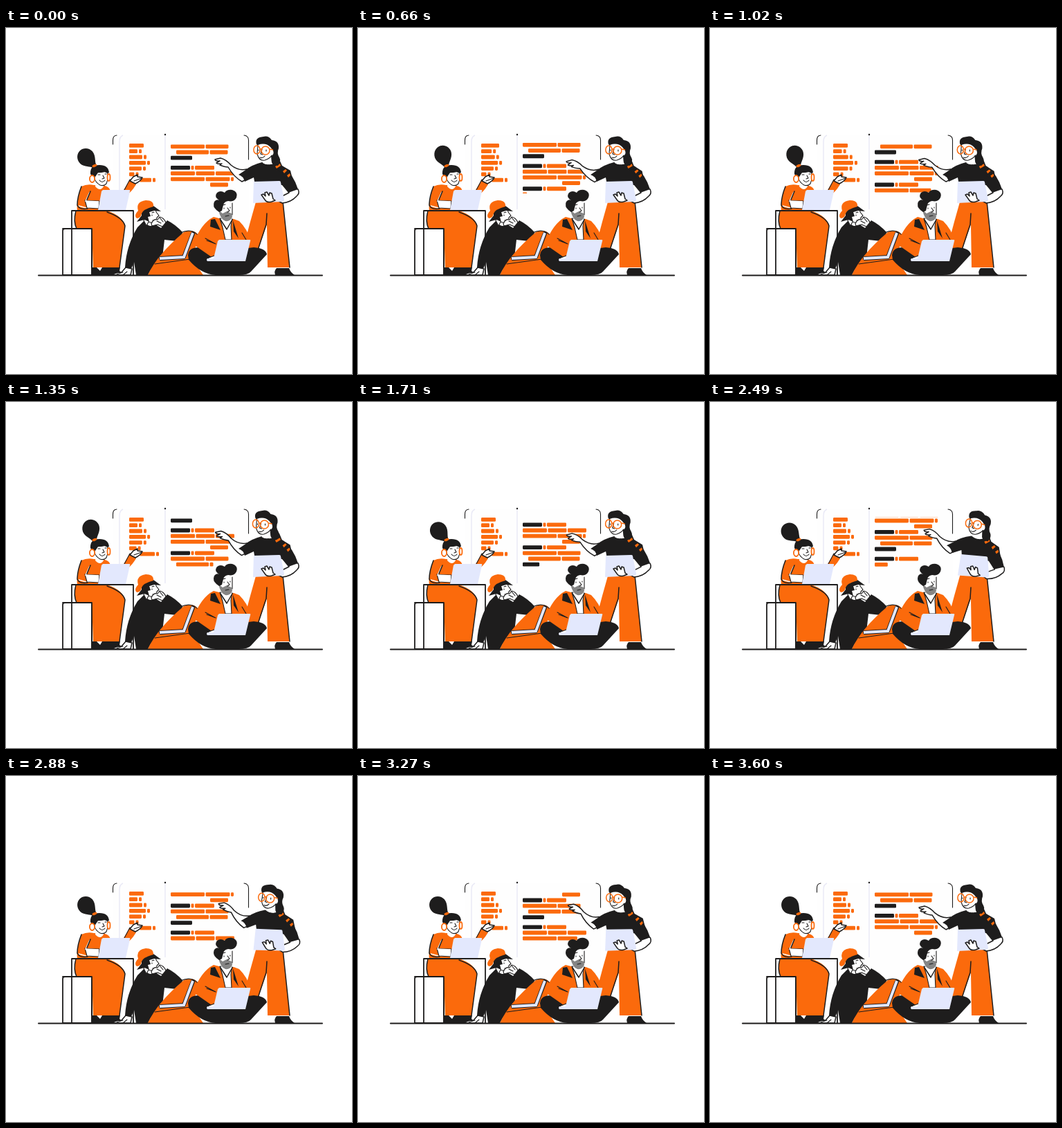
Animation, 500 px wide and 500 px high, one loop 3.63 s. Source, as an HTML page:

```html
<!DOCTYPE html>
<html lang="en">
<head>
<meta charset="utf-8">
<title>Team at the code board</title>
<style>
html, body { margin: 0; width: 100%; height: 100%; overflow: hidden; background: #fff; }
svg { display: block; width: 100vw; height: 100vh; }
.o { fill: #fb6a0c; }
.d { fill: #1e1d1d; }
.w { fill: #fff; }
.l { fill: #e3e8fd; }
.g { fill: #858585; }
.s { stroke: #1e1d1d; stroke-width: 1.5; stroke-linejoin: round; stroke-linecap: round; }
.n { fill: none; }
.thin { stroke-width: 1.1; }
.desk { stroke-width: 1.8; }
.ring { fill: none; stroke: #fb6a0c; stroke-width: 1.5; }
</style>
</head>
<body>
<svg viewBox="0 0 500 500">
  <defs><clipPath id="page"><rect x="234" y="166" width="116" height="73"/></clipPath></defs>

  <!-- board -->
  <path fill="#fefefe" d="M154 357V162Q154 155 161 155H344Q351 155 351 162V357Z"/>
  <path class="n" stroke="#e9e9f6" stroke-width="1.4" d="M164 250V164Q164 157 169 155M230 155V262"/>
  <path class="s n thin" d="M154.500 168V162Q154.500 155.500 160 155M344 155Q350.500 156 350.500 162V190"/>
  <circle class="d" cx="230" cy="154" r="1.200"/>
  <g id="menu"></g>
  <g clip-path="url(#page)"><g id="code"></g></g>

  <!-- woman at the desk -->
  <g id="tail"><path class="d" d="M-3 1C-4-5-12-9-12.500-17C-12.500-26-6-31 0-31C7-31 12.500-25 12.500-18C12-9 4-5 3 1Z"/></g>
  <path class="o" d="M150 235L169 236L179 219L188 226Q181 238 172 243H150Z"/>
  <path class="s n thin" d="M171 234L179 219L187 225"/>
  <path class="w s" d="M179 221L184 215L190 212L190 215L197 216Q195 221 187 225Z"/>
  <path class="s n thin" d="M185 221L196 217"/>
  <path class="w s desk" d="M82 357V293Q82 290 85 290H124V357Z"/>
  <path class="o" d="M101 263Q97 279 102 290H124L126 346H164L172 287Q170 272 146 264Z"/>
  <path class="s n" d="M101 264Q97 280 102 290M146 266Q169 274 172 286L164 346"/>
  <path class="d" d="M124 346H131L136 351L139 346H165L164 351Q168 353 167 357H125Z"/>
  <path class="o" d="M109 229Q117 225 127 227L143 228Q150 230 151 236L148 264H103Q101 252 109 229Z"/>
  <path class="w" d="M130 222H141V229Q136 237 129 229Z"/>
  <path class="w s thin" d="M135 250Q123 250 114 249L117 260L134 261Z"/>
  <path class="n" stroke="#fff" stroke-width="1.400" d="M121 237L115 250L134 251M105 257L116 260"/>
  <path class="s n" d="M109 229Q103 244 103 256Q106 263 118 261M122 236L117 248"/>
  <path class="d" d="M122 211Q121 198 135 198Q148 198 149 209L143 211L127 219Z"/>
  <path class="w s thin" d="M128 209Q138 209 146 207Q149 215 145 225Q141 229 136 227Q129 223 128 217Z"/>
  <path class="d" d="M123 213Q122 202 135 200L147 204L147 210L140 207L133 209L129 215Z"/>
  <path class="s n thin" d="M140 213L142 217L139 218M135 220Q139 225 143 220M133 212H136M143 211H145"/>
  <g class="w" stroke="#fb6a0c" stroke-width="1.800">
    <ellipse cx="124.500" cy="218" rx="3.600" ry="5"/>
    <ellipse cx="148.500" cy="216" rx="2" ry="5"/>
  </g>
  <ellipse class="o" cx="128" cy="199" rx="3.600" ry="1.800" transform="rotate(-20 128 199)"/>
  <path class="l" d="M140 234H178Q180 234 179 236L173 263H133L138 236Z"/>
  <path class="s n desk" d="M95 357V264H184V357M82 290H124V357"/>

  <!-- boy in the cap -->
  <path class="w s" d="M153 357Q158 353 167 353L173 346L182 348L180 357Z"/>
  <path class="s n thin" d="M160 356L169 353M169 357L175 352"/>
  <path class="d" d="M190 288L199 279Q207 290 216 284L224 289L233 278Q245 284 255 295Q255 304 247 308L229 306L226 332Q212 342 205 357H188L185 338L181 348L172 346Q174 314 190 288Z"/>
  <path class="w s thin" d="M206 266L216 260L217 266L221 271L218 274L217 279Q212 283 206 280L203 286L199 278Z"/>
  <path class="d" d="M196 263L213 257L224 265L214 264L207 266L209 272L205 273L207 280L200 277L189 280L196 271Z"/>
  <path class="s n thin" d="M211 267L214 266M211 270V271M212 278L216 277"/>
  <path class="o" d="M191 264Q187 251 202 249Q214 249 213 258Q198 262 196 268Q195 275 189 275Q184 271 191 264Z"/>
  <path class="w s thin" d="M210 283Q213 275 219 277L222 273Q228 274 231 281L226 287L219 284L211 286Z"/>
  <path class="s n thin" d="M218 279L224 282M222 274L227 280"/>
  <path class="o" d="M205 357Q218 328 257 295Q270 290 277 298Q274 318 270 335L285 357Z"/>
  <path class="s n thin" d="M252 296Q268 289 277 299M215 341L266 334"/>
  <path class="n s" style="stroke-width:6" d="M270 297L257 331L224 333"/>
  <path class="n" stroke="#e3e8fd" stroke-width="4" d="M270 296L257 331L222 333"/>

  <!-- standing woman, lower part -->
  <path class="o" d="M362 248L353 280L345 310L354 350L377 284L378 346H410L400 248Z"/>
  <path class="s n" d="M400 250L410 346M377 268L376 284L355 348"/>
  <path class="d" d="M391 347H409Q411 353 417 357H389Q387 351 391 347Z"/>

  <!-- sitting man -->
  <path class="d" d="M263 328Q264 317 279 317L300 324L358 317Q375 318 377 327L354 352Q350 357 336 357H303Q282 356 264 335Z"/>
  <path class="o" d="M300 273L312 276H329L337 279Q349 291 353 306L350 317L300 333L277 317L270 313Q282 282 300 273Z"/>
  <path class="w s thin" d="M309 275L313 288L317 306H326L325 286L327 276Z"/>
  <path class="s n" d="M310 277L319 291L327 277"/>
  <path class="d" d="M296 277L302 276L310 292L295 287ZM328 278L336 304L329 294Z"/>
  <path class="s n thin" d="M288 304L303 312L290 307M341 296L347 306"/>
  <path class="w" d="M308 253L327 251L328 264L326 277L315 280L307 270Z"/>
  <path class="g" d="M307 263L313 268L319 265L326 268L327 273Q324 280 317 279Q310 277 307 263Z"/>
  <path class="s n thin" d="M327 253V270M320 260L323 264L320 266M315 260V261M324 259V260M313 256L317 255M317 272L322 271"/>
  <path class="d" d="M304 263Q298 258 301 251Q304 247 308 249Q300 244 305 238Q310 234 316 238Q319 233 327 234Q336 237 333 245Q330 252 321 250Q315 251 314 256L312 264L308 266Z"/>
  <path class="w s thin" d="M301 329L293 332L289 336H304Z"/>
  <path class="l" d="M308 306H352Q354 306 353 308L346 337H291Q289 335 291 333H300L306 308Z"/>

  <!-- standing woman, upper part -->
  <g id="body">
    <path class="w s" d="M406 229L422 233Q425 239 420 243Q412 252 399 253L392 249L399 243L409 238Z"/>
    <g id="arm">
      <path class="w s" d="M348 204Q336 207 325 198Q318 190 310 188L302 190Q303 193 309 192L304 195Q305 197 312 196L309 198Q316 201 321 201Q329 215 341 222L352 216Z"/>
    </g>
    <path class="d" d="M370 194Q354 198 345 206L336 212Q343 214 345 222L358 216L360 227H399L408 238L422 233Q415 211 400 200L389 195Q380 200 370 194Z"/>
    <path class="l" d="M358 222L395 221Q397 221 397 223L402 248Q402 251 399 251L357 253Z"/>
    <path class="w s" d="M384 251Q377 253 374 248L369 241L372 240L375 243L374 238L377 237L380 242L381 238L384 239L386 247L389 249Z"/>
    <g id="braid">
      <path class="d" d="M386 187L395 190L399 199L411 206L414 218L406 219L399 210L389 203Z"/>
      <path class="o" d="M389 200L396 196L397 199L391 203ZM400 207L404 204L406 206L402 210ZM406 213L410 210L411 213L408 216Z"/>
    </g>
    <g id="head">
      <path class="d" d="M362 168Q359 158 372 157Q379 155 384 162Q395 163 394 174Q391 181 395 187Q398 192 393 199L386 198L380 187Z"/>
      <path class="w" d="M364 169Q375 165 382 172L386 177Q388 183 383 185L384 196Q377 199 371 195L373 191Q367 192 364 185Z"/>
      <path class="s n thin" d="M364 169L363 182Q366 193 374 191Q381 189 384 184M370 175L368 182L371 183M367 187Q371 189 374 185M365 176V177M376 176V178"/>
      <ellipse class="ring" cx="362.500" cy="176" rx="4.600" ry="6"/>
      <circle class="ring" cx="375" cy="177" r="6"/>
      <path class="ring" d="M367 175H370M381 175L386 176"/>
    </g>
  </g>
  <path class="s n" style="stroke-width:2" d="M47 357.500H457"/>
</svg>
<script>
const LOOP = 3630, STEP = 30, ROW = 8.2, BLANK = 6, TOP = 231.8, SPACE = 1.5;
const ORANGE = '#fb6a0c', DARK = '#1e1d1d';
const $ = id => document.getElementById(id);
const clamp = (v, a = 0, b = 1) => Math.max(a, Math.min(b, v));
const ease = p => (p = clamp(p)) * p * (3 - 2 * p);
const bump = (t, mid, width) => Math.exp(-(((t - mid) / width) ** 2));

function bar(parent, x, y, width, fill = ORANGE) {
  const r = document.createElementNS('http://www.w3.org/2000/svg', 'rect');
  const attrs = { x, y, width, height: 5.8, rx: 1.4, fill };
  for (const k in attrs) r.setAttribute(k, attrs[k]);
  parent.append(r);
  return r;
}

// Eased motion through a few [time, value] poses.
const track = (t, [first, ...rest]) => {
  let [t0, v] = first;
  for (const [t1, next] of rest) {
    if (t < t1) return v + (next - v) * ease((t - t0) / (t1 - t0));
    [t0, v] = [t1, next];
  }
  return v;
};

// Lines in typing order; each is typed until just before the next begins.
const call = { x: 238, words: [28, 4, 28], dark: true };
const lines = [
  { at: 10, ...call },
  { at: 630, x: 238, words: [49, 33] },
  { at: 1070, x: 246, words: [47, 26] },
  { at: 1500, x: 238, words: [31], dark: true, blank: true },
  { at: 1810, ...call },
  { at: 2400, x: 238, words: [35, 27, 27] },
  { at: 2880, x: 238, words: [49, 35, 4] },
  { at: 3370, x: 295, words: [26] }
];
const period = lines.length * ROW + BLANK;

const bars = [];
let y = TOP;
lines.forEach((line, i) => {
  const next = lines[i + 1];
  line.end = next ? next.at - 40 : LOOP - 40;
  line.scrollAt = next ? next.at - 10 : LOOP - 150;
  line.height = ROW + (line.blank ? BLANK : 0);
  line.length = line.words.reduce((sum, w) => sum + w + SPACE, -SPACE);
  let x = line.x;
  line.words.forEach((w, k) => {
    const fill = line.dark && !k ? DARK : ORANGE;
    bar($('code'), x, y - period, w, fill);
    bars.push({ line, x, w, el: bar($('code'), x, y, 0, fill) });
    x += w + SPACE;
  });
  y += line.height;
});

const menu = [21, 12, 19, 24, 18, 7.5, 17].map((w, i) => {
  const x = i < 6 ? 178 : 193, top = 167 + i * 8.3;
  return { end: x + w, w, main: bar($('menu'), x, top, w), dot: i && bar($('menu'), x + w + 2, top, 4) };
});

const tail = [[0, -43], [660, -17], [1350, -17], [2070, -62], [2600, -43]];
const point = [[0, 0], [660, -3.5], [1350, 2], [2070, -7.5], [3270, 3], [LOOP, 0]];

const place = (id, value) => $(id).setAttribute('transform', value);

function render(t) {
  const up = lines.reduce((sum, l) => sum + l.height * ease((t - l.scrollAt) / 110), 0);
  place('code', `translate(0 ${-up})`);
  for (const { line, x, w, el } of bars) {
    const typed = clamp((t - line.at) / (line.end - line.at)) * line.length;
    el.setAttribute('width', clamp(line.x + typed - x, 0, w));
  }
  menu.forEach((m, i) => {
    const grow = 5 * bump(t, 660 + i * 115, 170);
    m.main.setAttribute('width', m.w + grow);
    if (m.dot) m.dot.setAttribute('x', m.end + 2 + grow);
  });
  const lean = bump(t, 2560, 430);
  place('tail', `translate(128 200) rotate(${track(t, tail)})`);
  place('body', `rotate(${7 * lean} 378 260)`);
  place('arm', `rotate(${track(t, point)} 352 207)`);
  place('head', `translate(${1.5 * (lean - bump(t, 1350, 350))} 0)`);
  place('braid', `rotate(${2 * Math.sin(t / LOOP * Math.PI * 2)} 391 192)`);
}

const t0 = performance.now();
function tick() {
  const t = (performance.now() - t0) % LOOP;
  render(Math.floor(t / STEP) * STEP);
  requestAnimationFrame(tick);
}
render(0);
requestAnimationFrame(tick);
</script>
</body>
</html>
```
